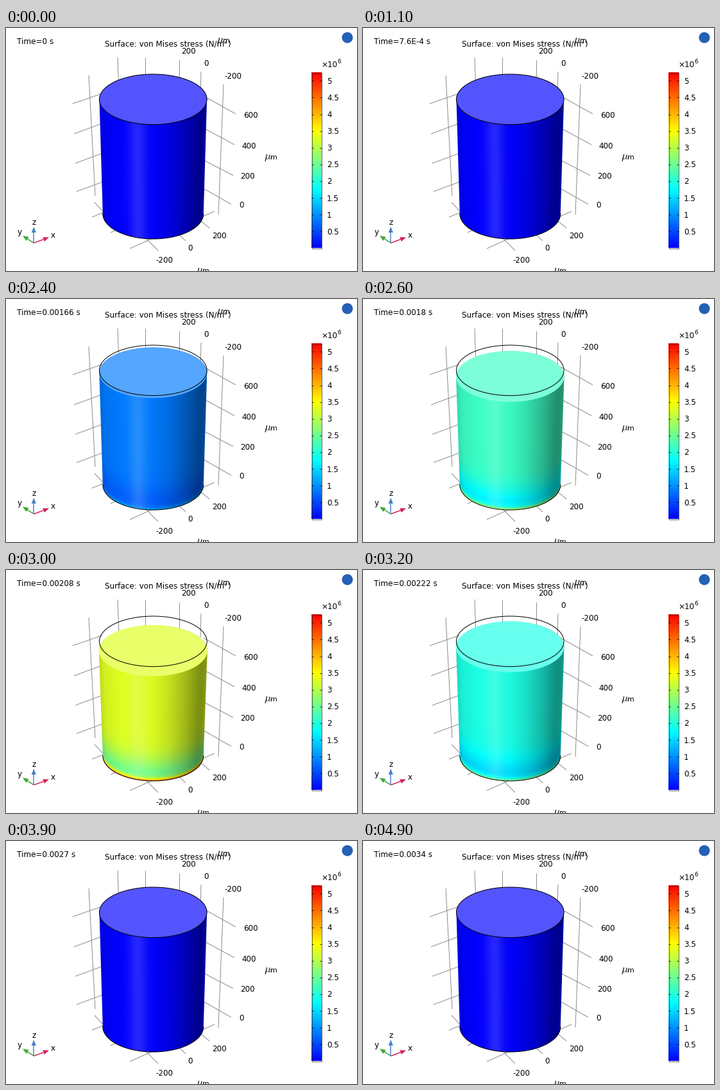
Write a matplotlib script that moves like this. It is 547 px wide and 379 px high and loops after 5 s.

```python
import numpy as np
import matplotlib.pyplot as plt
from matplotlib.animation import FuncAnimation
from matplotlib.patches import Circle, Ellipse, Polygon, Rectangle

W, H, DPI = 547, 379, 64
FRAMES, INTERVAL = 50, 100
PT = 72 / DPI  # points per pixel

plt.rcParams["font.family"] = "DejaVu Sans"
plt.rcParams["mathtext.fontset"] = "cm"

CX = 229.3
TOP_Y, TOP_RX, TOP_RY = 111.3, 83.8, 39.3
BASE_Y, BASE_RX, BASE_RY = 289.5, 78.5, 39.5
MAX_STRESS, PEAK_STRESS = 5.25, 3.55
PEAK_DROP = 15.7

fig = plt.figure(figsize=(W / DPI, H / DPI), dpi=DPI, facecolor="white")
ax = fig.add_axes([0, 0, 1, 1])
ax.set_xlim(0, W)
ax.set_ylim(H, 0)
ax.axis("off")


def label(x, baseline, text, ha="center", size=12, **kw):
    return ax.text(x, baseline, text, ha=ha, va="baseline",
                   fontsize=size * PT, color="black", zorder=8, **kw)


def line(x0, y0, x1, y1, color="#808080", width=0.9, z=1):
    ax.plot([x0, x1], [y0, y1], color=color, lw=width * PT, zorder=z,
            solid_capstyle="butt")


def rainbow(s):
    """Blue, cyan, yellow, red at equal steps of s in 0..1."""
    stops = [0, 1 / 3, 2 / 3, 1]
    return np.stack([np.interp(s, stops, c) for c in
                     ([0, 0, 1, 1], [0, 1, 1, 0], [1, 1, 0, 0])], axis=-1)


def pulse(ticks):
    """Gaussian load, ticks in units of 1e-5 s."""
    return np.exp(-((ticks - 200) ** 2) / (2 * 20 ** 2))


def time_text(ticks):
    t = ticks * 1e-5
    if ticks == 0:
        value = "0"
    elif t < 1e-3:
        exponent = -5 if ticks < 10 else -4
        value = f"{ticks * 10.0 ** (-5 - exponent):.2g}E{exponent}"
    else:
        value = f"{t:.5f}".rstrip("0")
    return f"Time={value} s"


# Axis frame behind the cylinder
for seg in [
    (129, 74, 139, 262), (174, 46, 176, 100), (217, 46, 217, 100),
    (270, 50, 270, 100), (304, 68, 303, 105), (339, 88, 331, 291),
    (104, 118, 150, 102), (106, 165, 152, 148),
    (108, 211, 154, 194), (110, 255, 156, 238),
    (308, 106, 358, 134), (306, 155, 356, 182),
    (304, 204, 354, 230), (302, 247, 351, 275),
    (134, 295, 156, 286), (163, 319, 184, 310), (193, 344, 226, 329),
    (138, 272, 154, 289), (302, 296, 325, 286),
    (298, 296, 317, 312), (264, 317, 280, 332), (218, 328, 237, 347),
]:
    line(*seg)

for x, y, s in [(284, 40, "200"), (312, 59, "0"), (354, 79, "-200"),
                (381, 140, "600"), (379, 188, "400"), (376.5, 235, "200"),
                (366.5, 280, "0"), (332, 328, "200"), (286.5, 347, "0"),
                (247, 366, "-200")]:
    label(x, y, s)
for x, y in [(328.5, 23), (402.5, 205), (296.5, 382)]:
    label(x, y, r"$\mu$", "left", 16.5)
    label(x + 9.5, y, "m", "left", 11)

label(154, 29, "Surface: von Mises stress (N/m", "left")
label(339.8, 24, "2", "left", 8)
label(345, 29, ")", "left")
clock = label(17, 25, "", "left")

# Colour legend
ramp = rainbow(np.linspace(1, 0, 274))[:, None]
ax.imshow(ramp, extent=(476, 492, 343, 69), aspect="auto", zorder=2)
ax.add_patch(Rectangle((476.5, 69.5), 15, 274, fill=False, ec="#303030",
                       lw=0.7 * PT, zorder=3))
for i in range(1, 11):
    y = 343.4 - i * 26.1
    line(476, y, 479, y, "black", 0.8, 4)
    line(489, y, 492, y, "black", 0.8, 4)
    label(500, y + 4.5, f"{i / 2:g}", "left")
label(491, 61, "×10", "left")
label(516, 55, "6", "left", 9)

# Orientation triad
for tip, color, name, pos in [((67, 326.5), "#d81e5b", "x", (73.5, 327)),
                              ((26, 324), "#3fa535", "y", (21, 322)),
                              ((43.3, 310), "#4682c8", "z", (44, 307))]:
    origin, tip = np.array([43.3, 335.3]), np.array(tip)
    d = (tip - origin) / np.hypot(*(tip - origin))
    side = np.array([-d[1], d[0]]) * 3.6
    neck = tip - d * 9
    line(*origin, *neck, color, 1.5, 4)
    ax.add_patch(Polygon([tip, neck + side, neck - side], fc=color, lw=0, zorder=4))
    label(*pos, name)

ax.add_patch(Circle((532, 15), 8.5, fc="#2460b4", lw=0, zorder=4))

# Cylinder
X0, X1, Y0, Y1 = 140, 320, 66, 334
SS = 2
px, py = np.meshgrid(np.arange(X0, X1, 1 / SS) + 0.5 / SS,
                     np.arange(Y0, Y1, 1 / SS) + 0.5 / SS)
arc = np.linspace(0, np.pi, 90)

body = ax.imshow(np.ones(px.shape + (3,)), extent=(X0, X1, Y1, Y0),
                 aspect="auto", interpolation="bilinear", zorder=3)
outline = Polygon(np.zeros((3, 2)), fc="none", ec="none")
ax.add_patch(outline)
body.set_clip_path(outline)
lid = Ellipse((CX, TOP_Y), 2 * TOP_RX, 2 * TOP_RY, lw=0, zorder=4)
ax.add_patch(lid)
ax.add_patch(Ellipse((CX, TOP_Y), 2 * TOP_RX, 2 * TOP_RY, fill=False,
                     ec="black", lw=PT, zorder=5))
ax.plot(CX + BASE_RX * np.cos(arc), BASE_Y + BASE_RY * np.sin(arc),
        color="black", lw=PT, zorder=5)
ax.set_xlim(0, W)
ax.set_ylim(H, 0)


def shade(color, u):
    diffuse = np.interp(u, [-1, -.9, -.6, 0, .3, .6, .85, .93, 1],
                        [.86, .94, 1, .98, .88, .73, .57, .56, .62])
    gloss = 0.15 * np.exp(-((u + 0.29) / 0.17) ** 2)
    color = color * diffuse[..., None]
    return color + (1 - color) * gloss[..., None]


def wall_profile(v):
    """Relative stress against height: rim peak, dip above it, then uniform."""
    return 1 + 0.75 * np.exp(-v / 0.02) - 0.27 * np.exp(-(v / 0.2) ** 2)


def update(i):
    ticks = i * 340 // (FRAMES - 1)
    load = pulse(ticks)
    clock.set_text(time_text(ticks))

    top_y = TOP_Y + PEAK_DROP * load
    top_rx, top_ry = TOP_RX + 0.8 * load, TOP_RY + 0.6 * load

    v = np.clip((BASE_Y + 30 - py) / (BASE_Y - top_y), 0, 1)
    for _ in range(3):
        u = np.clip((px - CX) / (BASE_RX + (top_rx - BASE_RX) * v), -1, 1)
        bulge = np.sqrt(1 - u ** 2)
        low, high = BASE_Y + BASE_RY * bulge, top_y + top_ry * bulge
        v = np.clip((low - py) / (low - high), 0, 1)

    level = PEAK_STRESS * load / MAX_STRESS
    body.set_data(np.clip(shade(rainbow(level * wall_profile(v)), u), 0, 1))
    lid.set_facecolor(rainbow(level) * 0.67 + 0.33)
    lid.set_center((CX, top_y))
    lid.set_width(2 * top_rx)
    lid.set_height(2 * top_ry)

    base = np.c_[CX + BASE_RX * np.cos(arc), BASE_Y + BASE_RY * np.sin(arc)]
    rim = np.c_[CX - top_rx * np.cos(arc), top_y - top_ry * np.sin(arc)]
    outline.set_xy(np.vstack([base, rim]))
    body.set_clip_path(outline.get_path(), outline.get_transform())
    return clock, body, lid


anim = FuncAnimation(fig, update, frames=FRAMES, interval=INTERVAL,
                     repeat=True, repeat_delay=0, blit=False)
plt.show()
```
